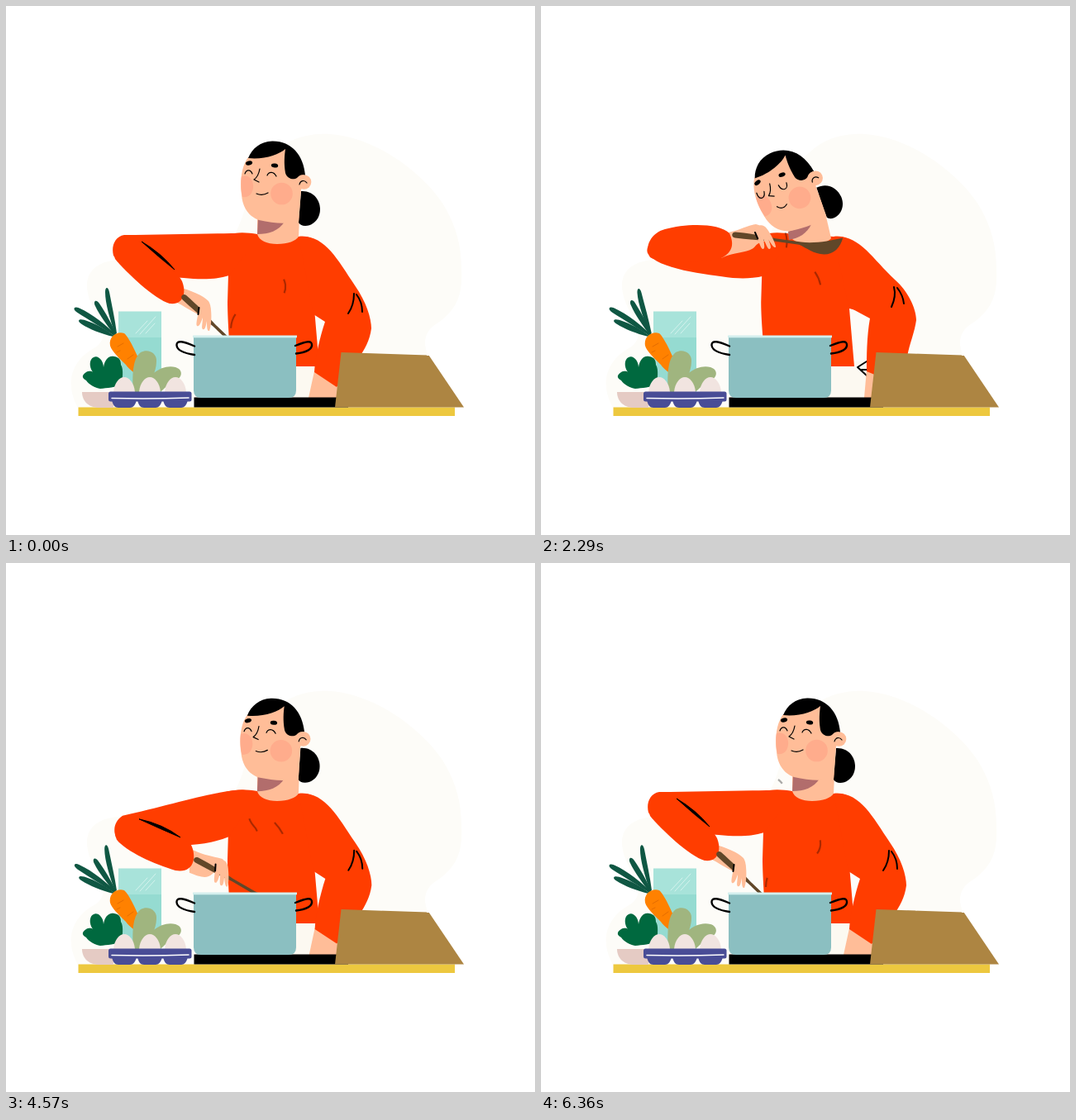
These frames come from a looping animation (640x640 px, 6.43 s). An HTML page:

```html
<!DOCTYPE html>
<html lang="en">
<head>
<meta charset="utf-8">
<title>Cooking</title>
<style>
  html, body { margin: 0; width: 100%; height: 100%; overflow: hidden; background: #fff; }
  svg { display: block; width: 100vw; height: 100vh; }
  .shirt { fill: #ff3d00; }
  .skin { fill: #ffbd98; }
  .blush { fill: #ffac8c; }
  .leaf { fill: #0f5743; }
  .line { fill: none; stroke: #000; stroke-width: 1.5; stroke-linecap: round; stroke-linejoin: round; }
  .thin { stroke-width: 1.2; }
  .steam { fill: none; stroke: #000; stroke-opacity: .33; stroke-width: 2.2; stroke-dasharray: 17 133; }
</style>
</head>
<body>
<svg viewBox="0 0 640 640">
  <path fill="#fdfcf8" d="M87 486C70 455 80 428 108 413C134 395 98 370 98 338C98 315 120 305 150 307L265 290C292 270 290 205 325 177C345 158 370 154 392 155C442 158 500 196 529 240C549 273 552 300 551 335C549 360 537 374 520 385C506 394 504 408 511 424L520 486Z"/>
  <rect x="87.500" y="485.500" width="455.500" height="10.500" fill="#edc83f"/>

  <!-- glass -->
  <rect x="136" y="369.500" width="52" height="97" fill="#a8e3da"/>
  <rect x="140" y="401" width="48" height="66" fill="#95dbd1"/>
  <path class="line" style="stroke:#d5f3ee;stroke-width:1" d="M157 396L171 381M162 397L181 376M169 396L180 384"/>

  <!-- vegetables -->
  <path class="leaf" d="M131 399C119 391 100 380 86 371C80 367 82 363 88 365.500C105 373 122 387 133 398Z"/>
  <path class="leaf" d="M130 400C115 396 101 390 92 384C86 380 88 377 95 379C110 384 122 392 131 399Z"/>
  <path class="leaf" d="M131 398C123 387 113 374 108 363C105 357 109 354 113 360C121 372 129 386 133 397Z"/>
  <path class="leaf" d="M132 397C126 380 120 360 120 346C120 340 123.500 339 125 346C128 362 132 380 134 396Z"/>
  <path fill="#ff8100" d="M126 411C124 400 134 393 143 396C150 402 160 425 168 445C160 449 150 441 145 434C138 427 128 418 126 411Z"/>
  <path class="line" style="stroke:#e56c00;stroke-width:1" d="M135 412L142 408M147 427L154 422M134 419L138 417"/>
  <path fill="#00693f" d="M114 463C108 462 100 458 97 453C91 450 92 446 97 443C101 441 104 442 105 443C100 436 101 427 106 425C112 422 118 430 118 437C119 429 124 422 131 424C138 425 139 430 139 434C143 440 140 452 141 457C133 462 122 462 114 463Z"/>
  <path fill="#a0b57f" d="M165 467C170 445 190 433 205 437C215 440 213 450 206 452C195 456 190 467 185 467ZM154 467C152 440 155 425 163 419C172 414 183 420 182 430C182 445 172 455 172 467Z"/>
  <path fill="#e5cbc4" d="M92 467H130V486H113C98 486 92 476 92 467Z"/>
  <g id="eggs" fill="#f1e4e0"></g>
  <rect x="124" y="466.500" width="100.500" height="12" rx="2.500" fill="#494d96"/>
  <path class="line" style="stroke:#fff" d="M128 474.500Q175 475.500 221 474"/>

  <!-- cook -->
  <rect x="340" y="430" width="54" height="46" fill="#fcf9f1"/>
  <path class="shirt" id="torso"/>
  <path class="line" style="stroke-width:2" d="M394 430L383 437L395 448M388 440H395"/>
  <path class="skin" id="restHand"/>
  <path class="shirt" id="restArm"/>
  <path class="line" id="elbow" style="stroke-width:2"/>
  <path class="shirt" id="upper"/>
  <path class="skin" id="neck"/>
  <path fill="#b26d6c" id="shade"/>
  <path class="steam" id="steamA" pathLength="150" d="M272 392C272 375 282 365 294 361C303 354 308 352 313 350C316 342 308 333 302 321C296 314 291 309 296 296C299 286 298 270 287 262"/>
  <path class="steam" id="steamB" pathLength="150" d="M289 385C284 372 300 366 322 361C335 354 339 346 338 337C336 327 330 319 324 313C312 303 303 300 299 288L298 278"/>
  <g id="head">
    <path d="M357 224C372 223 380 235 380 246C380 258 371 266 362 266C358 266 355 264 354 262Z"/>
    <path class="skin" d="M293 183C284 195 283 215 285 228C286 245 295 255 306 259C320 262 335 264 345 262L354 262L357 222L362 205C355 190 340 175 338 172Z"/>
    <path d="M293 184C298 172 308 164 322 163.500C345 163 360 180 362 205C357 203 354 206 352 208C348 211 340 209 338 202C336 190 337 180 338 173C330 180 312 186 293 184Z"/>
    <circle class="skin" cx="360.500" cy="213" r="8.800"/>
    <path class="blush" d="M285 206C295 203 300 212 299 220C298 228 293 232 286 231C284 222 284 212 285 206Z"/>
    <circle class="blush" cx="333.500" cy="227" r="13.300"/>
    <ellipse cx="294" cy="190" rx="4.200" ry="2.500" transform="rotate(-15 294 190)"/>
    <ellipse cx="325" cy="193" rx="4.200" ry="2.500" transform="rotate(6 325 193)"/>
    <path class="line thin" d="M307 197C306 203 303 208 300 210L306 213M355 216C356 211 361 210 364 214"/>
    <path class="line thin" id="face"/>
  </g>
  <path class="skin" id="palm"/>
  <path class="shirt" id="fore"/>
  <path id="crease" stroke="#000" stroke-width="1"/>
  <path id="spoon" fill="#614729" d="M1 -3.500C18 -3.500 36 -2 50 0L81 1.500C98 2 116 -3 131 -8C129 4 122 13 110 14C98 15 88 8 79 5L50 3.500C34 4 18 4 1 3.500C-4 3 -4 -3 1 -3.500Z"/>
  <g id="fingers">
    <path class="skin" d="M-6 2C0 -4 7 -2 8 6C9 16 8 26 6 31C3 32 3 25 3 19C2 24 1 31 -2 29C-4 28 -2 21 -2 15C-4 20 -6 27 -9 25C-11 23 -7 10 -6 2Z"/>
    <path class="line" style="stroke-width:2" d="M-6.500 3L-7.500 11"/>
  </g>

  <!-- pot and board -->
  <rect x="227.500" y="473.500" width="186.500" height="12"/>
  <path fill="#8bbfc1" d="M227 400H351V465Q351 474 342 474H236Q227 474 227 465Z"/>
  <rect x="226" y="398.500" width="126" height="2.800" fill="#d3efee"/>
  <path class="line" style="stroke-width:2.400" d="M228 411.500C215 406 206 403.500 206.500 410.500C207 417 218 420.500 228 422M350 411C364 405.500 370.500 404 370 411C369 417 359 419.500 351 420.500"/>
  <path fill="#ad8542" d="M405.500 419L511.500 422.500L554 485.500H398Z"/>
</svg>
<script>
const LOOP = 6430, STEPS = 90;
const $ = id => document.getElementById(id);
const leaves = [...document.querySelectorAll('.leaf')];

// Blends every number of two strings that share one structure.
function mix(a, b, u) {
  const ends = b.match(/-?[\d.]+/g);
  let i = 0;
  return a.replace(/-?[\d.]+/g, n => (+n + (ends[i++] - n) * u).toFixed(2));
}
const ramp = (t, from, to) => Math.min(1, Math.max(0, (t - from) / (to - from)));
const smooth = (t, from, to) => { const u = ramp(t, from, to); return u * u * (3 - 2 * u); };

$('eggs').innerHTML = [143, 174, 205].map(x =>
  `<path d="M${x - 13} 467C${x - 12} 456 ${x - 6} 449 ${x} 449C${x + 6} 449 ${x + 12} 456 ${x + 13} 467Z"/>` +
  `<path fill="#494d96" d="M${x - 15} 476H${x + 15}C${x + 14} 483 ${x + 10} 486 ${x + 7} 486H${x - 7}C${x - 11} 486 ${x - 14} 483 ${x - 15} 476Z"/>`
).join('');

// Upright and leaning shapes.
const lean = {
  restArm: [
    'M354 279C385 276 400 305 422 338C436 358 442 378 442 390C440 405 434 415 428 424L400 461L373 443C374 425 380 400 386 382L372 373Z',
    'M354 279C385 276 400 305 428 331C444 345 454 366 454 380C452 395 446 408 443 424L406 447L394 442C394 425 394 400 398 378L372 364Z'],
  restHand: ['M373 442L366 474L402 474L402 458Z', 'M394 440L391 474L412 474L412 444Z'],
  elbow: [
    'M421 348Q421 362 414 372M424 349Q431 358 431 370',
    'M427 340Q430 351 424 364M431 341Q438 350 439 360'],
  neck: [
    'M304 255L304 276C306 284 316 288 328 288C341 288 351 284 354 279L356 235Z',
    'M298 262L300 278C306 286 316 288 328 288C340 288 348 285 351 281L338 225Z'],
  shade: [
    'M305 257L337 261C330 272 318 276 304 276Z',
    'M299 273L327 264C322 275 312 281 300 283Z']
};

const smiling = 'M289 203C291 197 296 198 298 203M316 205C318 200 324 200 327 206M303 227Q310 230 317 226';
const relishing = 'M288 201C287 211 295 212 297 203M316 203C317 212 325 213 326 204M304 226Q309 233 316 228';

const poses = {
  stir: {
    upper: 'M290 275C250 275 190 277 143 277C132 279 127 290 130 302C140 316 200 329 215 329C235 331 255 331 270 326L290 300Z',
    fore: 'M150 280C175 290 205 318 213 333C218 345 216 362 198 360C180 355 145 322 132 306C126 290 135 278 150 280Z',
    palm: 'M210 340C225 345 238 350 245 357C249 363 248 372 246 378C240 378 235 376 232 373C222 368 214 362 205 358Z',
    crease: 'M164 285Q188 299 204 319Q185 304 164 285Z',
    spoon: 'translate(215 352) rotate(41)',
    fingers: 'translate(240 362) rotate(0)', ink: '1'
  },
  lift: {
    upper: 'M290 275C265 272 200 293 141 306C132 312 129 322 133 332C145 347 200 346 224 341C240 340 255 337 270 331L290 300Z',
    fore: 'M150 308C180 318 215 333 224 341C231 355 228 376 205 372C180 365 145 349 134 335C128 320 135 307 150 308Z',
    palm: 'M222 345C238 354 252 355 262 358C268 363 269 372 266 378C262 376 255 370 250 376C243 383 235 380 222 375Z',
    crease: 'M161 310Q190 316 211 332Q187 322 161 310Z',
    spoon: 'translate(230 359) rotate(27)',
    fingers: 'translate(260 361) rotate(-4)', ink: '1'
  },
  raise: {
    upper: 'M290 277C250 273 200 273 150 274C134 278 126 290 129 299C140 318 200 325 232 329C245 330 258 330 272 327L290 300Z',
    fore: 'M150 273C175 270 205 272 228 284C234 293 230 306 216 313C190 317 145 316 132 305C124 293 134 275 150 273Z',
    palm: 'M222 284C240 288 250 281 262 278C270 280 273 290 274 297C268 295 262 298 258 304C250 315 235 311 216 313Z',
    crease: 'M148 273Q178 267 208 273Q178 271 148 273Z',
    spoon: 'translate(235 288) rotate(8.5)',
    fingers: 'translate(263 283) rotate(-25)', ink: '0.5'
  },
  taste: {
    upper: 'M290 279C272 275 200 280 150 282C134 284 126 290 129 299C140 318 200 325 232 329C250 330 260 329 272 326L290 300Z',
    fore: 'M150 270C175 263 215 262 228 275C234 288 232 298 218 305C190 312 145 312 132 304C124 291 134 274 150 270Z',
    palm: 'M222 275C240 272 248 266 260 264C270 266 274 276 276 285C268 283 262 287 258 292C250 299 235 297 218 305Z',
    crease: 'M148 271Q178 263 208 266Q178 265 148 271Z',
    spoon: 'translate(234 277) rotate(5)',
    fingers: 'translate(263 268) rotate(-31)', ink: '0'
  },
  lower: {
    upper: 'M290 277C250 274 200 277 143 280C132 284 126 293 128 303C138 322 200 328 235 331C250 331 260 330 270 327L290 300Z',
    fore: 'M148 280C175 275 205 277 227 289C234 300 230 311 216 320C190 322 145 320 132 311C124 297 134 281 148 280Z',
    palm: 'M222 290C240 295 248 288 260 285C270 287 274 297 275 304C268 302 262 306 258 310C250 318 235 314 216 320Z',
    crease: 'M150 279Q178 275 203 278Q178 278 150 279Z',
    spoon: 'translate(235 295) rotate(9)',
    fingers: 'translate(262 289) rotate(-28)', ink: '0.5'
  }
};

const linear = u => u, easeIn = u => u * u, easeOut = u => 1 - (1 - u) ** 3;
const armKeys = [
  [0, 'stir', linear], [70, 'stir', easeIn], [480, 'lift', linear], [1070, 'raise', easeOut],
  [1430, 'taste', linear], [3450, 'taste', easeIn], [3790, 'lower', linear],
  [4570, 'lift', easeOut], [5500, 'stir', linear], [LOOP, 'stir', linear]
];

function drawArm(t) {
  const next = armKeys.findIndex(k => k[0] > t);
  const [from, a, ease] = armKeys[next - 1], [to, b] = armKeys[next];
  const u = ease(ramp(t, from, to));
  const part = name => mix(poses[a][name], poses[b][name], u);
  for (const name of ['upper', 'fore', 'palm', 'crease']) $(name).setAttribute('d', part(name));
  for (const name of ['spoon', 'fingers']) $(name).setAttribute('transform', part(name));
  $('crease').setAttribute('opacity', part('ink'));
}

function draw(t) {
  const k = smooth(t, 70, 1430) - smooth(t, 3450, 4700);
  for (const id in lean) $(id).setAttribute('d', mix(...lean[id], k));
  $('head').setAttribute('transform', `translate(${-28.5 * k} ${-5.3 * k}) rotate(${-23.5 * k} 362 213)`);

  const bliss = smooth(t, 1450, 1700) - smooth(t, 3000, 3250);
  $('face').setAttribute('d', mix(smiling, relishing, bliss));

  const breath = 4 * (ramp(t, 1100, 3790) - ramp(t, 3790, 4570));
  $('torso').setAttribute('d', `M266 277C280 273 292 274 304 276L354 279C370 277 380 285 385 300L385 369L373 366L379 436L272 436C${270 - breath} 405 ${268 - breath} 375 ${268 - breath} 358L${269 - breath} 325Z`);
  drawArm(t);

  const turn = 2 * Math.PI * t / LOOP;
  const sway = [1.8 - 1.6 * Math.cos(3 * turn), .3 - 1.5 * Math.cos(3 * turn), 1.8 * Math.sin(turn), 2 * Math.cos(4 * turn) - 2];
  leaves.forEach((leaf, i) => leaf.setAttribute('transform', `rotate(${sway[i]} 134 400)`));

  $('steamA').setAttribute('stroke-dashoffset', -(2 + 150 * 5 * t / LOOP));
  $('steamB').setAttribute('stroke-dashoffset', -(66 + 150 * 3 * t / LOOP));
}

const start = performance.now();
function tick() {
  const step = Math.floor(((performance.now() - start + 5) % LOOP) / LOOP * STEPS);
  draw(step * LOOP / STEPS);
  requestAnimationFrame(tick);
}
tick();
</script>
</body>
</html>
```
